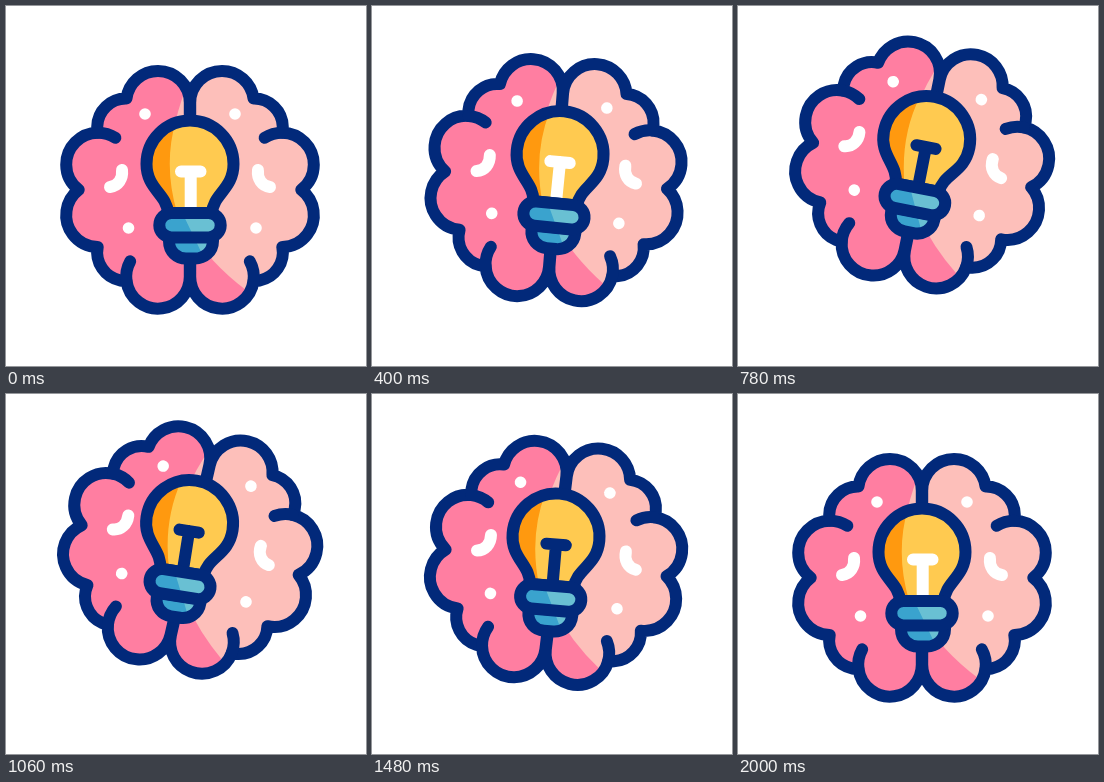
Animation, 360 px wide and 360 px high, one loop 2020 ms. Source, as an HTML page with a canvas:

```html
<!DOCTYPE html>
<html lang="en">
<head>
<meta charset="utf-8">
<title>Bright idea</title>
<style>
html, body { margin: 0; width: 100%; height: 100%; overflow: hidden; background: #fff; }
canvas { display: block; width: 360px; height: 360px; }
</style>
</head>
<body>
<canvas id="stage"></canvas>
<script>
const LOOP = 2020, STEP = 20, HALF = 1000;
const CX = 184, CY = 183.8, LINE = 12;
const NAVY = '#02297a', WHITE = '#fff';
const TAU = 2 * Math.PI, RAD = Math.PI / 180;
const canvas = document.getElementById('stage');
const dpr = window.devicePixelRatio || 1;
canvas.width = canvas.height = 360 * dpr;
const ctx = canvas.getContext('2d');

// Three lobes of the upper left quarter; the rest is mirrored
const lobe = (dx, dy, r) => ({ x: CX + dx, y: CY + dy, r });
const upper = [lobe(-32, -87, 31.8), lobe(-64, -62.5, 28.8), lobe(-92, -25.3, 31.8)];
const lower = upper.map(c => ({ ...c, y: 2 * CY - c.y })).reverse();
const lobes = [...upper, ...lower];

// Outer crossing point of two neighbouring circles
function crossing(a, b) {
  const dx = b.x - a.x, dy = b.y - a.y, d = Math.hypot(dx, dy);
  const turn = Math.acos((d * d + a.r * a.r - b.r * b.r) / (2 * d * a.r));
  const angle = Math.atan2(dy, dx) + turn;
  return { x: a.x + a.r * Math.cos(angle), y: a.y + a.r * Math.sin(angle) };
}
const angleAt = (c, p) => Math.atan2(p.y - c.y, p.x - c.x);

function mirror(path) {
  const both = new Path2D(path);
  both.addPath(path, new DOMMatrix([-1, 0, 0, 1, 2 * CX, 0]));
  return both;
}

const outline = new Path2D();
lobes.forEach((c, i) => {
  const from = i ? angleAt(c, crossing(lobes[i - 1], c)) : 0;
  const to = i < lobes.length - 1 ? angleAt(c, crossing(c, lobes[i + 1])) : 0;
  outline.arc(c.x, c.y, c.r, from, to, true);
});
outline.closePath();

// A lobe's line carried on into the brain
function hook(i, deg) {
  const c = lobes[i], path = new Path2D();
  path.arc(c.x, c.y, c.r, deg * RAD, angleAt(c, crossing(lobes[i - 1], c)), true);
  return mirror(path);
}

const body = mirror(outline);
const folds = [hook(2, -57), hook(5, -151)];
const squiggles = mirror(new Path2D('M116 164C117 173 112 180 104 181'));
const dots = [[139, 108], [229, 108], [122.5, 222], [250, 222]];
const paleSide = new Path2D('M183 60V75Q129 200 240 284L360 340V40H183Z');

const glass = new Path2D('M162 207C161 188 140.5 183 140.5 158A43.3 43.3 0 0 1 227.5 158C227.5 183 207 188 206 207Z');
const glassShade = new Path2D('M173 105Q155 155 172 210H130V105Z');
const filament = new Path2D('M175 165.5H194.5M184.7 165.5V204');
const cap = new Path2D('M163 231V235C163 246 171 252.5 180 252.5H189C198 252.5 207 246 207 235V231Z');
const collar = new Path2D('M165.5 207H202.5A12.2 12.2 0 0 1 202.5 231.4H165.5A12.2 12.2 0 0 1 165.5 207Z');
const baseShade = new Path2D('M173 200L186 227L200 256H140V200Z');

function stroke(path, color = NAVY) {
  ctx.strokeStyle = color;
  ctx.stroke(path);
}

function twoTone(path, color, shade, shadeColor) {
  ctx.save();
  ctx.clip(path);
  ctx.fillStyle = color;
  ctx.fill(path);
  ctx.fillStyle = shadeColor;
  ctx.fill(shade);
  ctx.restore();
}

function spin(x, y, deg) {
  ctx.translate(x, y);
  ctx.rotate(deg * RAD);
  ctx.translate(-x, -y);
}

function drawBrain() {
  twoTone(body, '#ff7ea1', paleSide, '#fdbfba');
  ctx.fillStyle = WHITE;
  for (const [x, y] of dots) {
    ctx.beginPath();
    ctx.arc(x, y, 5.8, 0, TAU);
    ctx.fill();
  }
  stroke(squiggles, WHITE);
  [body, ...folds].forEach(p => stroke(p));
}

function drawBulb(lit) {
  twoTone(glass, '#ffca50', glassShade, '#ff990f');
  stroke(filament, lit ? WHITE : NAVY);
  stroke(glass);
  for (const part of [cap, collar]) {
    twoTone(part, '#69c0d3', baseShade, '#3aa3ce');
    stroke(part);
  }
}

// The brain sways smoothly; the bulb swings evenly and turns back earlier
const sway = t => (1 - Math.cos(Math.PI * t / HALF)) / 2;
const swing = t => 11.4 * Math.min(t / 800, (2000 - t) / 1200);

function draw(t) {
  const lift = sway(t), lean = 13 * lift;
  ctx.setTransform(dpr, 0, 0, dpr, 0, 0);
  ctx.fillStyle = WHITE;
  ctx.fillRect(0, 0, 360, 360);
  ctx.lineCap = ctx.lineJoin = 'round';
  ctx.lineWidth = LINE;
  ctx.translate(0, -28 * lift);
  spin(CX + 0.4, 184.5, lean);
  drawBrain();
  spin(CX, 252, swing(t) - lean);
  drawBulb(Math.abs(t - HALF) > HALF / 2);
}

const start = performance.now();
function tick() {
  const t = (performance.now() - start) % LOOP;
  draw(Math.floor(t / STEP) * STEP);
  requestAnimationFrame(tick);
}
tick();
</script>
</body>
</html>
```
